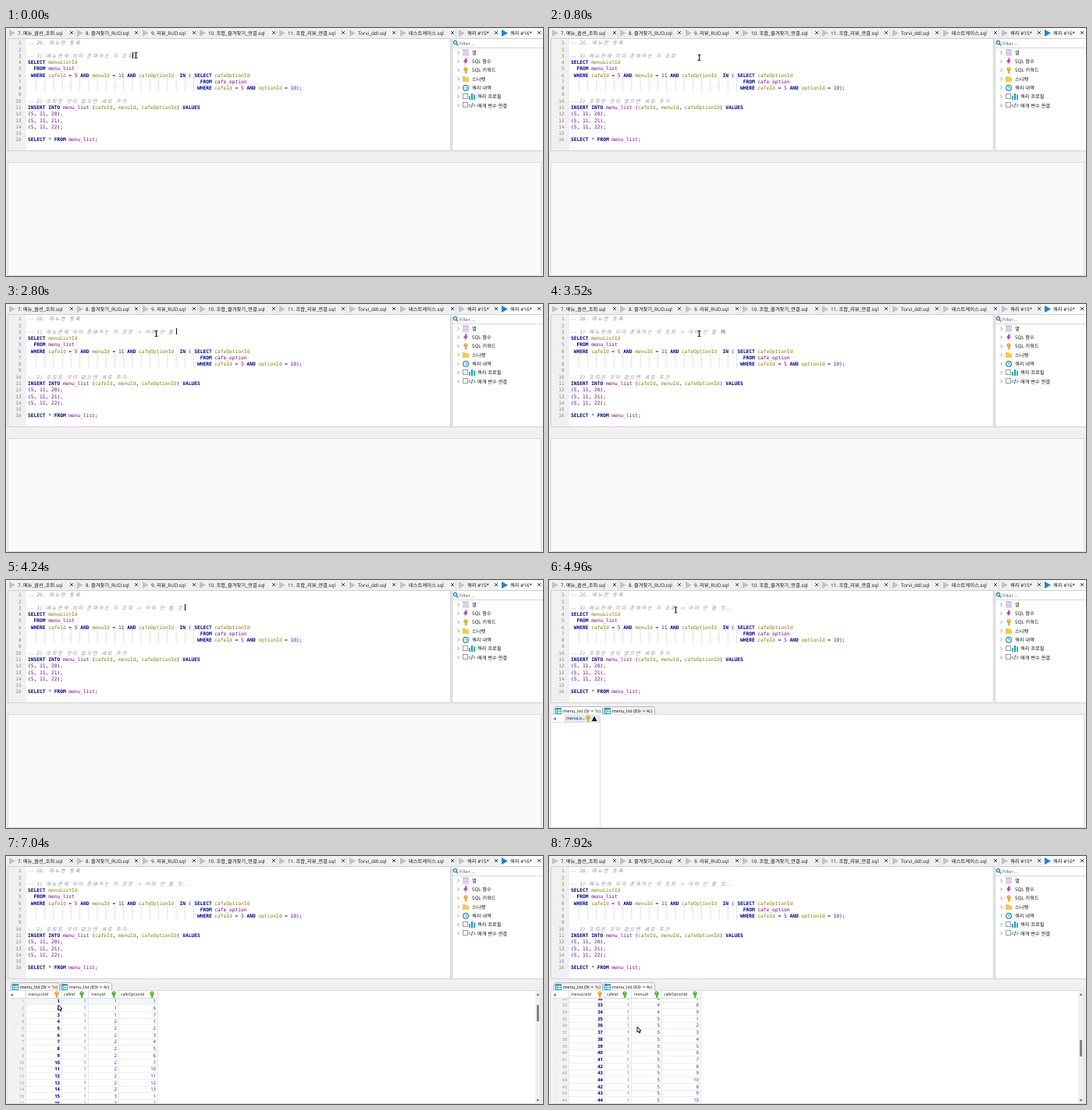
Animation of 688x318 px, one loop 8000 ms. Source, as an HTML page with a canvas:

```html
<!DOCTYPE html>
<html lang="ko">
<head>
<meta charset="utf-8">
<style>
html, body { margin: 0; width: 100%; height: 100%; overflow: hidden; background: #f0f0f0; }
canvas { display: block; }
</style>
</head>
<body>
<canvas id="stage" width="688" height="318"></canvas>
<script>
const g = document.getElementById('stage').getContext('2d');
const LOOP = 8000, STEP = 80;
const CELL = 3.74, LEFT = 28, PITCH = 8.27;
const ROW = 8.71, ROWS = 83;
const UI = '"Open Sans","Noto Sans CJK KR","Noto Sans CJK",sans-serif';
const MONO = '"DejaVu Sans Mono","Noto Sans CJK KR","Noto Sans CJK",monospace';
const NAVY = '#00009c', OLIVE = '#808000', PURPLE = '#800080', GREY = '#929292';
const isHangul = c => /[\u3131-\ud7a3]/.test(c);

function box(x, y, w, h, fill) { g.fillStyle = fill; g.fillRect(x, y, w, h); }

function frame(x, y, w, h, color) {
  g.strokeStyle = color; g.lineWidth = 1;
  g.strokeRect(x + .5, y + .5, w - 1, h - 1);
}

function line(points, color, width = 1) {
  g.strokeStyle = color; g.lineWidth = width;
  g.beginPath();
  points.forEach(([x, y]) => g.lineTo(x, y));
  g.stroke();
}

function poly(points, fill) {
  g.fillStyle = fill;
  g.beginPath();
  points.forEach(([x, y]) => g.lineTo(x, y));
  g.closePath();
  g.fill();
}

function disc(x, y, r, fill) {
  g.fillStyle = fill;
  g.beginPath(); g.arc(x, y, r, 0, 7); g.fill();
}

function label(s, x, y, size = 6.3, color = '#111', align = 'left', weight = '') {
  g.font = `${weight} ${size}px ${UI}`;
  g.fillStyle = color; g.textAlign = align;
  g.fillText(s, x, y);
}

// Code text sits on a character grid; Hangul takes two cells.
function code(s, col, y, color, style = '') {
  g.font = `${style} 6.25px ${MONO}`;
  g.fillStyle = color; g.textAlign = 'left';
  for (const c of s) {
    const wide = isHangul(c);
    g.fillText(c, LEFT + col * CELL + (wide ? .8 : 0), y);
    col += wide ? 2 : 1;
  }
  return col;
}

const SQL = [
  '-- 26. 메뉴판 등록', '',
  '-- 1) 메뉴판에 이미 존재하는 지 조회 ',
  'SELECT menuListId',
  '  FROM menu_list',
  ' WHERE cafeId = 5 AND menuId = 11 AND cafeOptionId  IN ( SELECT cafeOptionId',
  ' '.repeat(59) + 'FROM cafe_option',
  ' '.repeat(58) + 'WHERE cafeId = 5 AND optionId = 10);', '',
  '-- 2) 조회된 것이 없으면 새로 추가',
  'INSERT INTO menu_list (cafeId, menuId, cafeOptionId) VALUES',
  '(5, 11, 20),', '(5, 11, 21),', '(5, 11, 22);', '',
  'SELECT * FROM menu_list;'
];

const TYPED = [
  [0, ''], [880, '-'], [960, '->'], [1120, '-> '], [1280, '-> ㅇ'], [1440, '-> 아'],
  [1600, '-> 암'], [1680, '-> 아마'], [1840, '-> 아마 '], [2000, '-> 아마 ㅇ'],
  [2080, '-> 아마 아'], [2160, '-> 아마 안'], [2320, '-> 아마 안 '], [2400, '-> 아마 안 ㄸ'],
  [2480, '-> 아마 안 뜨'], [2560, '-> 아마 안 뜰'], [2720, '-> 아마 안 뜰 '],
  [3280, '-> 아마 안 뜰 ㄱ'], [3440, '-> 아마 안 뜰 거'], [3600, '-> 아마 안 뜰 것'],
  [4080, '-> 아마 안 뜰 것.'], [4320, '-> 아마 안 뜰 것..']
];

function tokenColor(tok) {
  if (/^[A-Z]{2,}$/.test(tok)) return NAVY;
  if (/^\d|_/.test(tok)) return PURPLE;
  return /^\w/.test(tok) ? OLIVE : '#0000c0';
}

function sqlLine(s, y) {
  if (s.startsWith('--')) return code(s, 0, y, GREY, 'italic');
  let col = 0;
  for (const tok of s.match(/\w+|\s+|[^\w\s]/g) || []) {
    const color = tokenColor(tok);
    col = code(tok, col, y, color, color === NAVY ? 'bold' : '');
  }
  return col;
}

const baseline = i => Math.round(21.3 + i * PITCH);

function editor(t) {
  box(3, 13, 567, 145, '#fff');
  box(3, 13, 23, 144, '#f0f0f0');
  frame(2, 13, 568, 145, '#d0d0d0');
  g.setLineDash([1.5, 1.5]);
  for (let x = 38.5; x < 242; x += 3 * CELL) line([[x, 64], [x, 81]], '#b5b5b5', .8);
  g.setLineDash([]);
  let col = 0;
  SQL.forEach((s, i) => {
    const y = baseline(i);
    g.font = `6px ${MONO}`; g.fillStyle = '#858585'; g.textAlign = 'right';
    g.fillText(i + 1, 19.5, y);
    const end = sqlLine(s, y);
    if (i === 2) col = end;
  });
  const [since, text] = TYPED.filter(k => k[0] <= t).pop();
  const y = baseline(2);
  const composing = isHangul(text.slice(-1));
  col = code(composing ? text.slice(0, -1) : text, col, y, GREY, 'italic');
  if (composing) code(text.slice(-1), col, y, '#000');
  else if (t < 4900 && (t - since) % 1060 < 530) {
    box(Math.round(LEFT + (text ? col : col - 1) * CELL) - 1, 31, 1, 8, '#000');
  }
}

const TABS = [
  [4, '7. 메뉴_옵션_조회.sql', 84], [91, '8. 즐겨찾기_RUD.sql', 167], [175, '9. 리뷰_RUD.sql', 241],
  [248, '10. 조합_즐겨찾기_연결.sql', 343], [350, '11. 조합_리뷰_연결.sql', 432],
  [440, 'Torvi_ddl.sql', 497], [505, '테스트케이스.sql', 572], [580, '쿼리 #15*', 628], [635, '쿼리 #16*', 683]
];

function tabStrip() {
  TABS.forEach(([x, name, close], i) => {
    const active = i === TABS.length - 1;
    if (active) box(632, 0, 56, 13, '#fbfbfb');
    poly([[x, 2], [x + 8, 6.5], [x, 11]], active ? '#1784d8' : '#c2c2c2');
    label(name, x + 11, 9);
    line([[close - 2, 4], [close + 2, 8]], '#333', .9);
    line([[close + 2, 4], [close - 2, 8]], '#333', .9);
    if (!active) box(close + 4, 1, 1, 11, '#dedede');
  });
}

function key(x, y, color) {
  disc(x, y - 1.3, 2.6, color);
  box(x - .9, y, 1.8, 4.4, color);
  box(x, y + 2.2, 2, 1, color);
  disc(x, y - 2.2, .7, '#fff');
}

const ICONS = [
  y => { for (let i = 0; i < 4; i++) box(585, y - 4 + i * 2.2, 8, 1.3, i % 2 ? '#c9b8dc' : '#b5a3cf'); },
  y => poly([[589, y - 4], [586, y + .6], [588.6, y + .6], [587.2, y + 4.2], [592, y - 1], [589.4, y - 1], [591, y - 4]], '#b52ac0'),
  y => key(589, y, '#f5a11c'),
  y => { box(585, y - 3, 4, 2, '#e8b020'); box(585, y - 2, 8, 5.5, '#fac83c'); },
  y => {
    disc(589, y, 4, '#1591ab'); disc(589, y, 2.8, '#fff');
    line([[589, y - 2], [589, y], [591, y + .6]], '#1591ab', .9);
  },
  y => { box(593, y - 1, 2, 5, '#12b5d2'); box(596, y - 4, 2, 8, '#1298c8'); box(599, y - 2.5, 2, 6.5, '#12b5d2'); },
  y => {
    line([[595, y - 2], [593, y], [595, y + 2]], '#2d5576', .9);
    line([[597.8, y - 3], [596.2, y + 3]], '#2d5576', .9);
    line([[599, y - 2], [601, y], [599, y + 2]], '#2d5576', .9);
  }
];

function sidePanel() {
  box(571, 13, 117, 145, '#fff');
  frame(571, 13, 118, 145, '#d0d0d0');
  box(572, 25, 116, 1, '#d8d8d8');
  g.strokeStyle = '#2876b8'; g.lineWidth = 1.2;
  g.beginPath(); g.arc(575.5, 18.5, 2.2, 0, 7); g.stroke();
  line([[577, 20.2], [579.3, 22.6]], '#2876b8', 1.3);
  label('Filter ...', 581, 22, 5.9, '#555');
  ['열', 'SQL 함수', 'SQL 키워드', '스니펫', '쿼리 내역', '쿼리 프로필', '매개 변수 연결'].forEach((name, i) => {
    const y = 31.5 + i * 11.3, boxed = i > 4;
    line([[578.5, y - 2], [580.5, y], [578.5, y + 2]], '#777', .8);
    if (boxed) frame(585, Math.round(y) - 4, 7, 7, '#999');
    ICONS[i](y);
    label(name, boxed ? 604 : 597, Math.round(y + 2.2));
  });
}

function tableIcon(x, y) {
  box(x, y, 8, 8, '#1b9eb4');
  box(x + 1, y + 2.3, 1.6, 4.8, '#bdeaf0');
  box(x + 3.4, y + 2.3, 3.8, 2, '#fff');
  box(x + 3.4, y + 5, 3.8, 2, '#fff');
}

function resultTab(x, w, name, active) {
  g.beginPath();
  g.moveTo(x + .5, 172.5); g.lineTo(x + .5, 165); g.lineTo(x + 2, 162.5);
  g.lineTo(x + w - 2, 162.5); g.lineTo(x + w - .5, 165); g.lineTo(x + w - .5, 172.5);
  g.fillStyle = active ? '#fff' : '#f2f2f2'; g.fill();
  g.strokeStyle = '#b8b8b8'; g.lineWidth = 1; g.stroke();
  tableIcon(x + 2, 164);
  label(name, x + 12, 170, 5.7);
}

function emptyResult() {
  box(20, 173, 45, 9, '#dcebf8');
  label('#', 6, 180, 5.2);
  label('menuLis...', 22, 179, 5.2);
  key(50, 177.5, '#f5a11c');
  poly([[58, 174.5], [61.5, 181], [54.8, 181]], '#111');
  box(20, 173, 1, 9, '#d5d5d5');
  box(65, 173, 1, 144, '#dedede');
  box(4, 182, 61, 1, '#dedede');
}

// First row id, first option for each menu.
const MENUS = [[1, 1], [4, 1], [15, 1], [26, 1], [35, 1], [45, 1], [56, 1], [67, 1], [76, 1]];

function record(id) {
  const menu = MENUS.filter(m => m[0] <= id).length;
  let option = id - MENUS[menu - 1][0] + MENUS[menu - 1][1];
  if (menu === 1 && id > 1) option += 4;
  if (menu === 2 && option > 7) option += 2;
  return [id, 1, menu, option];
}

const COLS = [
  ['menuListId', 28, 65, 69, NAVY], ['cafeId', 74, 97, 103, '#7a45c8'],
  ['menuId', 109, 138, 142, '#2424b4'], ['cafeOptionId', 147, 187, 192, '#2424b4']
];

function fullResult(t) {
  const step = Math.max(0, Math.min(11, (t - 7040) / STEP));
  const top = 31.42 * step / 11;
  g.save();
  g.beginPath(); g.rect(4, 182, 673, 135); g.clip();
  box(4, 182, 21, 135, '#f2f2f2');
  for (let r = Math.floor(top); r < Math.min(ROWS, top + 16); r++) {
    const mid = 186 + (r - top) * ROW, y = Math.round(mid + 2.2);
    // Lower rows repaint one wheel notch late.
    const stale = step > 0 && mid > 291;
    const id = stale ? Math.max(1, r - 2) : r + 1;
    if (id === 1) box(25, 182, 170, mid + 4.3 - 182, '#f0f6fc');
    box(4, Math.round(mid + 4.2), 190, 1, '#efefef');
    label(id, 23, y, 5.4, '#888', 'right');
    record(id).forEach((v, i) => label(v, COLS[i][3], y, 6, COLS[i][4], 'right', i ? '' : 'bold'));
  }
  [25, 71, 105, 144, 194].forEach(x => box(x, 182, 1, 135, '#e8e8e8'));
  g.restore();
  label('#', 6, 180, 5.2);
  COLS.forEach(([name, x, k], i) => {
    label(name, x, 179, 5, '#111');
    key(k, 177.5, i ? '#4fb51c' : '#f5a11c');
  });
  [25, 71, 105, 144, 194].forEach(x => box(x, 173, 1, 9, '#dcdcdc'));
  box(4, 182, 190, 1, '#dcdcdc');
  box(678, 173, 7, 144, '#f0f0f0');
  poly([[679.5, 179], [681.5, 176], [683.5, 179]], '#777');
  poly([[679.5, 312], [681.5, 315], [683.5, 312]], '#777');
  box(680, Math.round(191 + top * 45 / 31.42), 3, 21, '#858585');
}

function results(t) {
  const ready = t >= 4960, second = t >= 6480;
  box(2, 172, 684, 146, ready ? '#fff' : '#f9f9f9');
  frame(2, 172, 684, 146, '#dcdcdc');
  if (!ready) return;
  resultTab(6, 63, 'menu_list (0r × 1c)', !second);
  resultTab(69, 67, 'menu_list (83r × 4c)', second);
  if (second) fullResult(t); else emptyResult();
}

const PATH = [
  [0, 166, 35], [160, 166, 35], [720, 192, 38], [3600, 192, 38], [4000, 215, -14], [4720, 200, -14],
  [5440, 52.5, 188], [6080, 52.5, 188], [6400, 98, 166], [6560, 98, 166],
  [6960, 67, 191], [7040, 67, 191], [7360, 113, 219], [8000, 113, 219]
];

function pointer(t) {
  const i = PATH.findIndex(p => p[0] > t);
  const [t0, x0, y0] = PATH[i - 1], [t1, x1, y1] = PATH[i];
  const k = (t - t0) / (t1 - t0), e = k * k * (3 - 2 * k);
  const x = x0 + (x1 - x0) * e, y = y0 + (y1 - y0) * e;
  if (y > 13 && y < 157 && x > 25 && x < 569) {
    const cx = Math.round(x);
    box(cx, y - 3.5, 1, 7, '#000');
    box(cx - 1.5, y - 4, 4, 1, '#333');
    box(cx - 1.5, y + 3, 4, 1, '#333');
    return;
  }
  const arrow = [[0, 0], [0, 7], [1.6, 5.5], [2.8, 8], [3.9, 7.5], [2.8, 5], [5, 5]].map(([a, b]) => [x + a, y + b]);
  poly(arrow, '#fff');
  line([...arrow, arrow[0]], '#000', .9);
}

function draw(now) {
  const t = Math.floor(now % LOOP / STEP) * STEP;
  g.textRendering = 'geometricPrecision';
  box(0, 0, 688, 318, '#f0f0f0');
  tabStrip();
  editor(t);
  sidePanel();
  results(t);
  pointer(t);
}

let start;
function tick(now) {
  start ??= now;
  draw(now - start);
  requestAnimationFrame(tick);
}
draw(0);
requestAnimationFrame(tick);
</script>
</body>
</html>
```
